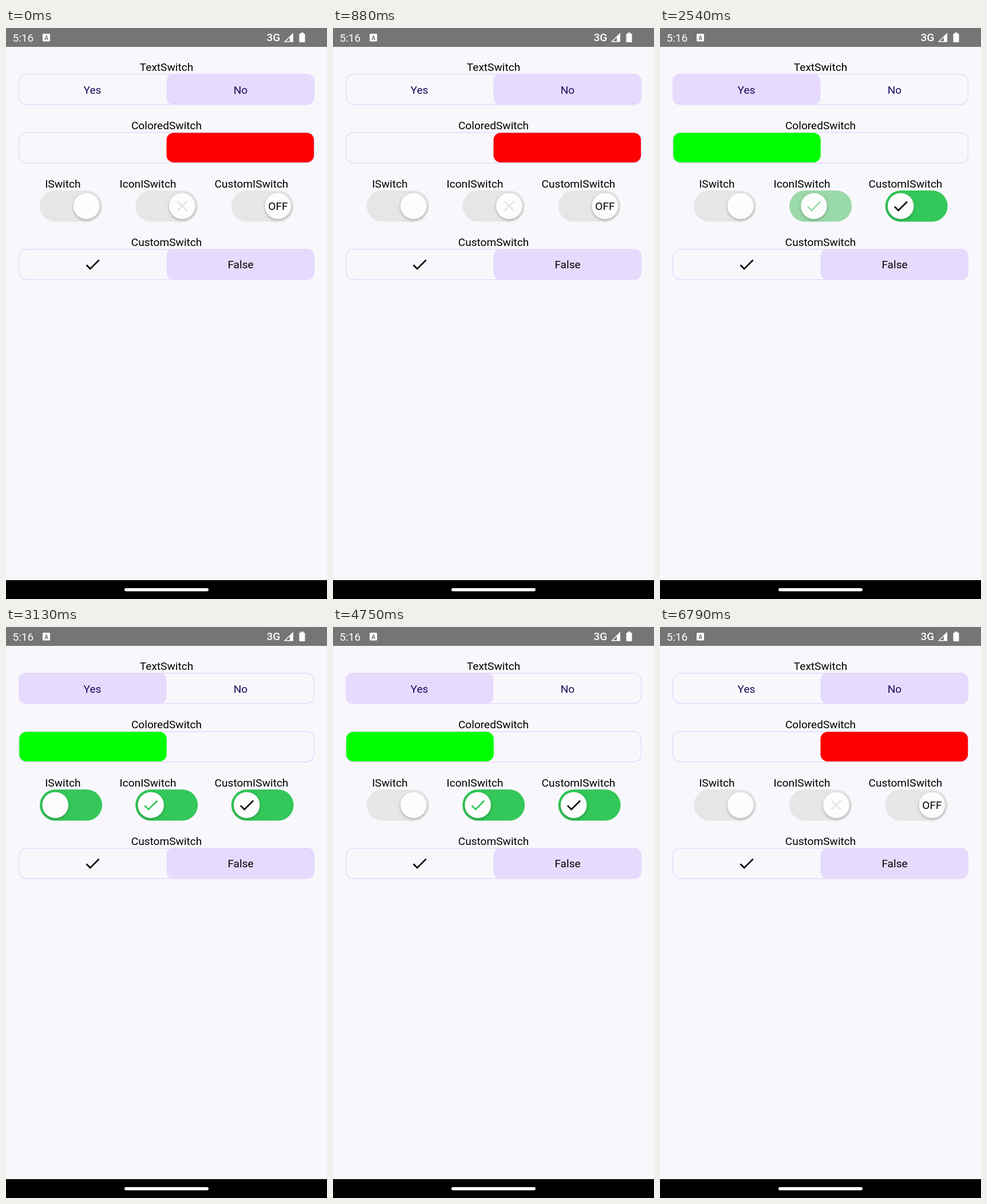
Write an HTML page that moves like this. It is 561x998 px and loops after 6.92 s.

```html
<!DOCTYPE html>
<html lang="en">
<head>
<meta charset="utf-8">
<title>Switches</title>
<style>
  html, body { margin: 0; width: 100%; height: 100%; overflow: hidden; background: #f8f8fc; }
  svg { display: block; width: 100vw; height: 100vh; }
  text { font: 19.1px Roboto, Arial, sans-serif; text-anchor: middle; }
  .bar text { fill: #fff; text-anchor: start; }
  .knob { fill: #fdfdfd; filter: drop-shadow(0 2px 2.5px rgba(0, 0, 0, .25)); }
</style>
</head>
<body>
<svg id="stage" viewBox="0 0 561 998" preserveAspectRatio="none">
  <defs>
    <path id="check" transform="scale(1.364) translate(-12 -12)" d="M9 16.17 4.83 12l-1.42 1.41L9 19 21 7l-1.41-1.41z"/>
    <path id="cross" transform="scale(1.364) translate(-12 -12)" d="M19 6.41 17.59 5 12 10.59 6.41 5 5 6.41 10.59 12 5 17.59 6.41 19 12 13.41 17.59 19 19 17.59 13.41 12z"/>
  </defs>
  <rect width="561" height="998" fill="#f8f8fc"/>
  <g class="bar">
    <rect width="561" height="33" fill="#757575"/>
    <text x="11.5" y="23.5">5:16</text>
    <rect x="64" y="10" width="13" height="13.5" rx="1.5" fill="#fff"/>
    <text x="67.2" y="20.6" style="font-size:10px;font-weight:700;fill:#757575">A</text>
    <text x="455.5" y="23.3" style="font-weight:500">3G</text>
    <path d="M487.5 23.8 501.3 10v13.8z" fill="none" stroke="#fff" stroke-width="1.5"/>
    <path d="M496 15.5 501.5 10v14H496z" fill="#fff"/>
    <path d="M515 8h5v2h1.5q1 0 1 1v13q0 1-1 1h-8q-1 0-1-1V11q0-1 1-1H515z" fill="#fff"/>
  </g>
  <rect y="965" width="561" height="33"/>
  <rect x="207" y="979" width="147" height="5.4" rx="2.7" fill="#fff"/>
</svg>
<script>
const LOOP = 6920, DURATION = 300;
const LAVENDER = '#e6dafd';
const GREY = [230, 230, 230], GREEN = [52, 199, 89];
const stage = document.getElementById('stage');

function add(parent, tag, attrs, text = '') {
  const node = document.createElementNS('http://www.w3.org/2000/svg', tag);
  for (const key in attrs) node.setAttribute(key, attrs[key]);
  node.textContent = text;
  parent.appendChild(node);
  return node;
}
const label = (x, y, text, fill = '#000', parent = stage) => add(parent, 'text', { x, y, fill }, text);

const outQuad = u => 1 - (1 - u) ** 2;
const inOutQuad = u => u < .5 ? 2 * u * u : 1 - 2 * (1 - u) ** 2;
const mix = (a, b, p) => a + (b - a) * p;
const rgb = channels => `rgb(${channels.map(Math.round)})`;
const gammaRamp = p => rgb([255 * (1 - p) ** (1 / 2.2), 255 * p ** (1 / 2.2), 0]);

// 0 = off, 1 = on; each switch is tapped once on and once off
function phase(t, on, off) {
  const ramp = start => Math.min(1, Math.max(0, (t - start) / DURATION));
  const leaving = t >= off;
  const u = ramp(leaving ? off : on);
  const direct = p => leaving ? 1 - p : p;
  return { on: t >= on && !leaving, move: direct(outQuad(u)), tint: direct(inOutQuad(u)) };
}

function segment(top, title, on, off, colored) {
  label(280.5, top - 5, title);
  add(stage, 'rect', { x: 22.7, y: top + .7, width: 515.8, height: 53, rx: 13, fill: 'none', stroke: LAVENDER, 'stroke-width': 1.5 });
  const inset = colored ? 1.2 : 0;
  const pill = add(stage, 'rect', {
    y: top + inset, width: colored ? 257.6 : 258.5, height: 54.2 - 2 * inset, rx: 12.5, fill: LAVENDER
  });
  return t => {
    const s = phase(t, on, off);
    pill.setAttribute('x', mix(280.5, 22 + inset, s.move));
    if (colored) pill.setAttribute('fill', gammaRamp(s.tint));
  };
}

function toggle(left, labelX, title, on, off, kind) {
  label(labelX, 279, title);
  const track = add(stage, 'rect', { x: left, y: 284, width: 109, height: 54.5, rx: 27.25 });
  const knob = add(stage, 'g', {});
  add(knob, 'circle', { r: 22.8, class: 'knob' });
  let check, other;
  if (kind) {
    check = add(knob, 'use', { href: '#check' });
    other = kind === 'icon' ? add(knob, 'use', { href: '#cross' }) : label(0, 7, 'OFF', '#000', knob);
  }
  return t => {
    const s = phase(t, on, off);
    const color = rgb(GREY.map((c, i) => mix(c, GREEN[i], s.tint)));
    track.setAttribute('fill', color);
    knob.setAttribute('transform', `translate(${left + mix(81.7, 27, s.move)} 311.2)`);
    if (!kind) return;
    check.setAttribute('visibility', s.on ? 'visible' : 'hidden');
    other.setAttribute('visibility', s.on ? 'hidden' : 'visible');
    if (kind === 'icon') [check, other].forEach(icon => icon.setAttribute('fill', color));
  };
}

const parts = [
  segment(80, 'TextSwitch', 950, 6060),
  segment(182, 'ColoredSwitch', 1383, 5603, true),
  toggle(59, 99.3, 'ISwitch', 2850, 4420),
  toggle(226.2, 248, 'IconISwitch', 2402, 4790, 'icon'),
  toggle(393.7, 429, 'CustomISwitch', 1900, 5180, 'text'),
  segment(386, 'CustomSwitch', 3330, 4000)
];
label(151, 115, 'Yes', '#1c0a5e');
label(410, 115, 'No', '#1c0a5e');
label(410, 420.3, 'False');
add(stage, 'use', { href: '#check', x: 151.3, y: 413.3 });

function draw(t) {
  parts.forEach(update => update(t));
}
function tick() {
  draw(performance.now() % LOOP);
  requestAnimationFrame(tick);
}
tick();
</script>
</body>
</html>
```
